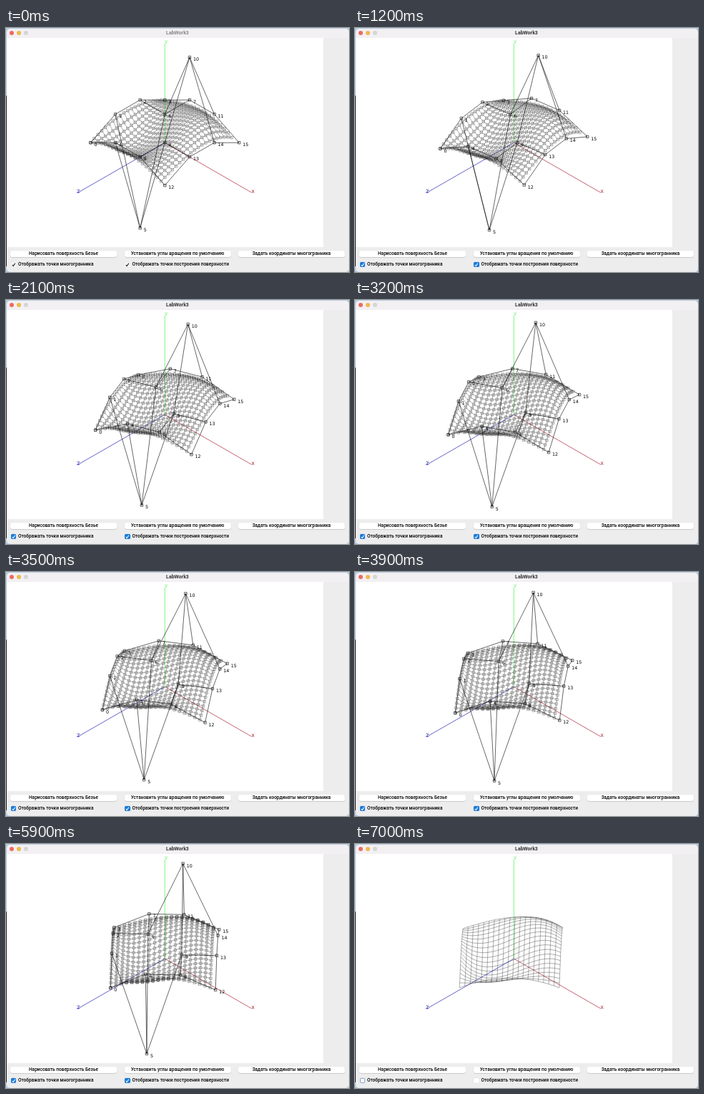
An HTML page with a canvas for the animation above (7100 ms loop, 480 by 343 pixels).

```html
<!DOCTYPE html>
<html lang="ru">
<head>
<meta charset="utf-8">
<title>LabWork3</title>
<style>
  html, body { margin: 0; width: 480px; height: 343px; overflow: hidden; }
  body { position: relative; background: linear-gradient(#b4cfe0 95px, #222 95px 335px, #b4cfe0 335px); }
  div, canvas, i { position: absolute; box-sizing: border-box; white-space: nowrap; }
  #win { left: 1px; top: 1px; width: 479px; height: 341.5px; border-radius: 5px;
    background: linear-gradient(#f2f0f3 13px, #ededed 13px); }
  #title { left: 0; top: 1px; width: 480px; height: 13px; text-align: center;
    font: 700 7px/13px Roboto, sans-serif; color: #333; }
  .dot { top: 4px; width: 6px; height: 6px; border-radius: 3px; }
  canvas { left: 1px; top: 14px; width: 443px; height: 294px; background: #fff; }
  .btn, .check { font: 500 6.5px/9px Roboto, sans-serif; color: #000; }
  .btn { top: 313px; width: 149px; height: 9px; text-align: center; background: #fff;
    border-radius: 2.5px; box-shadow: 0 .4px 1px #0004; }
  .check { top: 328px; height: 9px; padding-left: 10.5px; }
  .check i { left: 0; top: .5px; width: 7.5px; height: 7.5px; border-radius: 1.7px;
    background: #fff; box-shadow: 0 0 1px #0004; }
  .check svg { position: absolute; left: 0; top: 0; width: 7.5px; height: 7.5px; fill: none;
    stroke: #fff; stroke-width: 1.1; display: none; }
  .on svg { display: block; }
  .on i { background: #1a7bdc; }
  .idle #title { color: #888; }
  .idle .on i { background: #f4f4f4; box-shadow: none; }
  .idle .on svg { stroke: #111; }
  #polyBox:not(.on) i { border: .6px solid #85a9cf; }
</style>
</head>
<body>
<div id="win"></div>
<div id="title">LabWork3</div>
<div class="dot" style="left:4.5px;background:#ec6a5e"></div>
<div class="dot" style="left:14.5px;background:#f0b84c"></div>
<div class="dot" style="left:24.5px;background:#d6d5d6"></div>
<canvas width="443" height="294"></canvas>
<div class="btn" style="left:6px">Нарисовать поверхность Безье</div>
<div class="btn" style="left:165.5px">Установить углы вращения по умолчанию</div>
<div class="btn" style="left:325px">Задать координаты многогранника</div>
<div class="check" id="polyBox" style="left:6.5px"><i><svg viewBox="0 0 7.5 7.5"><path d="M1.8 4 3.2 5.7 5.8 1.8"/></svg></i>Отображать точки многогранника</div>
<div class="check" id="meshBox" style="left:166px"><i><svg viewBox="0 0 7.5 7.5"><path d="M1.8 4 3.2 5.7 5.8 1.8"/></svg></i>Отображать точки построения поверхности</div>
<script>
const LOOP = 7100, N = 20, COS30 = Math.sqrt(3) / 2;
const ctx = document.querySelector('canvas').getContext('2d');
const polyBox = document.getElementById('polyBox');
const meshBox = document.getElementById('meshBox');

// time in ms, rotation about the vertical axis in degrees
const turns = [[0, 0], [400, 0], [1200, 8], [1400, 8], [1700, 13], [1800, 13], [2100, 21],
  [2600, 25], [3000, 27], [3100, 27], [3200, 28], [3700, 36], [3800, 36], [3900, 38],
  [4200, 40], [4400, 40], [4700, 41], [4900, 41], [5600, 42.5], [5900, 43], [LOOP, 43]];

const heights = [0, 20, 20, 0, 20, -120, 20, 20, 20, 20, 120, 20, 0, 20, 20, 0];
const control = heights.map((y, i) => [-60 + 40 * (i >> 2), y, 60 - 40 * (i % 4)]);

const bernstein = t => [(1 - t) ** 3, 3 * t * (1 - t) ** 2, 3 * t * t * (1 - t), t ** 3];

// the surface is sampled at 0, 0.05 ... 0.95 both ways
const surface = Array.from({ length: N * N }, (_, k) => {
  const u = bernstein(Math.floor(k / N) / N), v = bernstein(k % N / N);
  return [0, 1, 2].map(axis =>
    control.reduce((sum, p, i) => sum + p[axis] * u[i >> 2] * v[i % 4], 0));
});

function angleAt(t) {
  const i = turns.findIndex(key => key[0] > t);
  const [t0, a0] = turns[i - 1], [t1, a1] = turns[i];
  return (a0 + (a1 - a0) * (t - t0) / (t1 - t0)) * Math.PI / 180;
}

const project = ([x, y, z]) => [222.3 + (x - z) * COS30, 161.2 + (x + z) / 2 - y];

function rotate([x, y, z], a) {
  const c = Math.cos(a), s = Math.sin(a);
  return [x * c + z * s, y, z * c - x * s];
}

function drawGrid(points, size) {
  ctx.beginPath();
  points.forEach((p, i) => {
    if (i % size) { ctx.moveTo(...points[i - 1]); ctx.lineTo(...p); }
    if (i >= size) { ctx.moveTo(...points[i - size]); ctx.lineTo(...p); }
  });
  ctx.stroke();
}

function drawSquares(points, side) {
  ctx.beginPath();
  for (const [x, y] of points) ctx.rect(x - side / 2, y - side / 2, side, side);
  ctx.stroke();
}

function setPen(color, width) {
  ctx.strokeStyle = ctx.fillStyle = color;
  ctx.lineWidth = width;
}

function drawAxis(end, color, name, dx) {
  const [x, y] = project(end);
  setPen(color, .65);
  ctx.beginPath();
  ctx.moveTo(...project([0, 0, 0]));
  ctx.lineTo(x, y);
  ctx.stroke();
  ctx.fillText(name, x + dx, y + .5);
}

function draw(now) {
  const t = Math.floor(now % LOOP / 100) * 100;
  const showPoly = t < 6400, showMesh = t < 7000;
  document.body.classList.toggle('idle', t < 100);
  polyBox.classList.toggle('on', showPoly);
  meshBox.classList.toggle('on', showMesh);

  ctx.setTransform(1, 0, 0, 1, -1, -14);
  ctx.clearRect(0, 0, 480, 343);
  ctx.font = '6.3px "DejaVu Sans", sans-serif';
  drawAxis([140, 0, 0], '#a01020', 'X', 0);
  drawAxis([0, 140, 0], '#40f040', 'Y', 0);
  drawAxis([0, 0, 140], '#1010b0', 'Z', -2);

  const angle = angleAt(t);
  const place = p => project(rotate(p, angle));
  const mesh = surface.map(place);
  setPen('#333', .4);
  drawGrid(mesh, N);
  if (showMesh) drawSquares(mesh, 3.5);
  if (showPoly) {
    const poly = control.map(place);
    setPen('#000', .6);
    drawGrid(poly, 4);
    drawSquares(poly, 3.5);
    poly.forEach(([x, y], i) => ctx.fillText(i, x + 5, y + 5));
  }
}

function frame() {
  draw(performance.now());
  requestAnimationFrame(frame);
}
frame();
</script>
</body>
</html>
```
